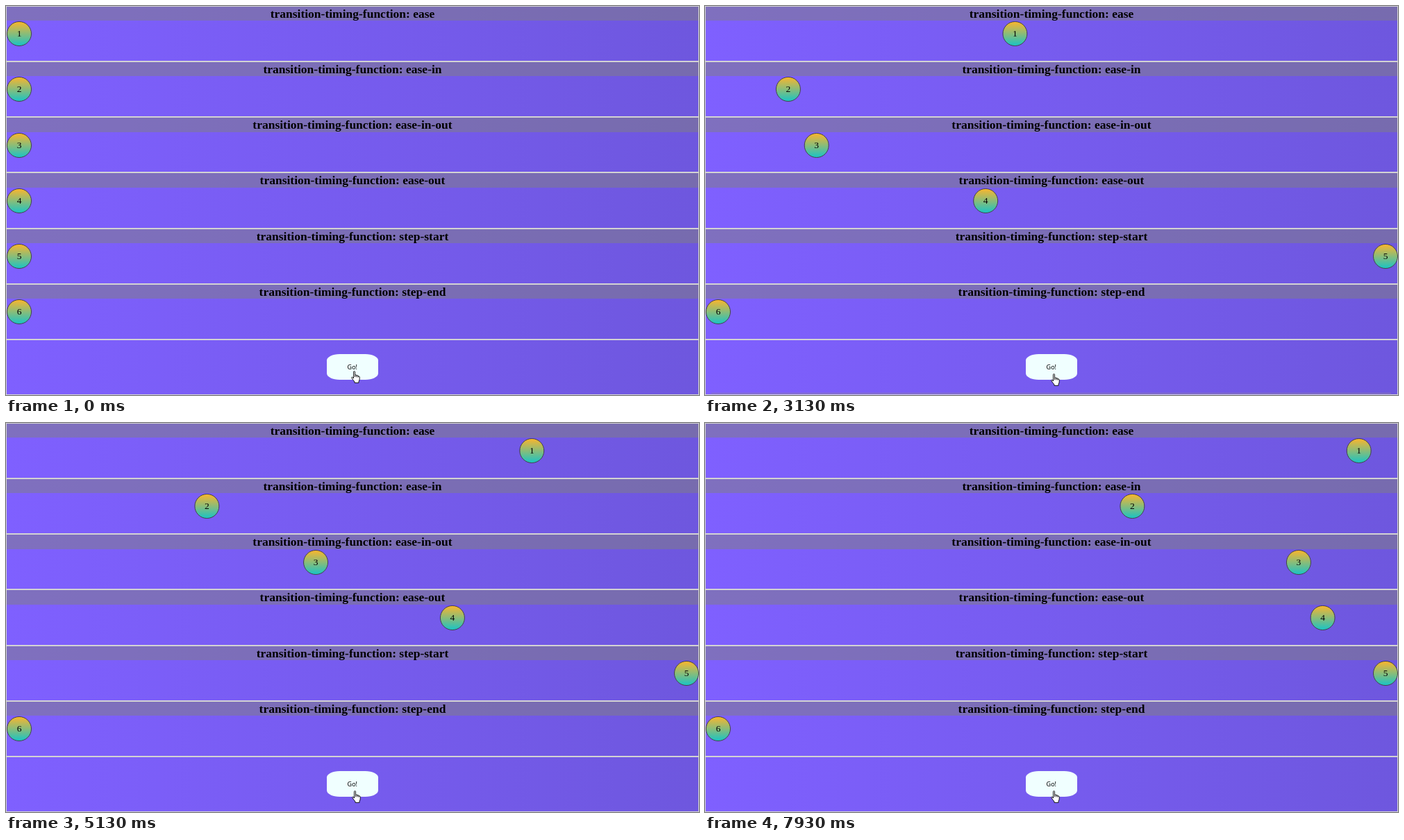
These frames come from a looping animation (998x561 px, 8 s). An HTML page:

```html
<!DOCTYPE html>
<html lang="en">
<head>
<meta charset="utf-8">
<title>Timing functions</title>
<style>
  html, body { margin: 0; width: 100%; height: 100%; overflow: hidden; }
  #stage {
    position: relative; width: 998px; height: 561px; overflow: hidden;
    background: linear-gradient(to right, #7f60ff, #6e57de);
    font-family: "Liberation Serif", serif; color: #000;
  }
  #stage > * { position: absolute; box-sizing: border-box; }
  .row { left: 0; width: 998px; height: 80.15px; border: .94px solid #d3d3d3; }
  .row h3 {
    margin: 0; height: 20.3px; background: rgba(128, 128, 128, .5);
    font-size: 17.5px; line-height: 20.3px; text-align: center;
  }
  .ball {
    left: 1px; width: 36px; height: 36px; border: 1.9px solid #444; border-radius: 50%;
    background: linear-gradient(#ffb529, #14c4c8) border-box;
    font-size: 13.5px; line-height: 33px; text-align: center;
  }
  #button {
    left: 462px; top: 502.3px; width: 73.6px; height: 36.8px;
    border-radius: 18.4px / 9.2px; background: azure;
    font: 9px/37px "Noto Sans", sans-serif; text-align: center;
  }
  #bar { left: 9px; top: 557.5px; width: 979px; height: 1.5px; background: #8878b4; }
  #hand { left: 497px; top: 526px; }
</style>
</head>
<body>
<div id="stage"></div>
<script>
const LOOP = 8000, STEP = 200 / 3, FIRST_TICK = 400;
const START = 480, DURATION = 9950, TRAVEL = 961, ROW = 80.15;

function bezier(x1, y1, x2, y2) {
  const curve = (a, b, s) => 3 * a * s * (1 - s) ** 2 + 3 * b * s * s * (1 - s) + s ** 3;
  return x => {
    let low = 0, high = 1;
    for (let i = 0; i < 30; i++) {
      const mid = (low + high) / 2;
      if (curve(x1, x2, mid) < x) low = mid; else high = mid;
    }
    return curve(y1, y2, low);
  };
}

const timings = [
  ["ease", bezier(.25, .1, .25, 1)],
  ["ease-in", bezier(.42, 0, 1, 1)],
  ["ease-in-out", bezier(.42, 0, .58, 1)],
  ["ease-out", bezier(0, 0, .58, 1)],
  ["step-start", p => p > 0 ? 1 : 0],
  ["step-end", p => p < 1 ? 0 : 1]
];

const stage = document.getElementById("stage");
const rows = timings.map(([name], i) =>
  `<div class="row" style="top:${i * ROW}px"><h3>transition-timing-function: ${name}</h3></div>
   <div class="ball" style="top:${22.2 + i * ROW}px">${i + 1}</div>`);
stage.innerHTML = rows.join("") + `
  <div class="row" style="top:${6 * ROW}px"></div>
  <div id="button">Go!</div>
  <div id="bar"></div>
  <svg id="hand" width="14" height="19" stroke="#000" stroke-width=".9" stroke-linejoin="round">
    <path fill="#fff" d="M3.5 11V1.8Q3.5.6 4.5.6T5.5 1.8V6.5Q6.3 5.7 7.7 6.2V7Q8.6 6.3 9.9 7V8Q12 7.4 12.2 9V12Q12 14 11 15.5V17.4H5V16Q3 13.5 1 10.8Q.3 9.3 1.5 9.2Q2.5 9.2 3.5 11Z"/>
    <path fill="none" d="M5.5 6.5V9M7.7 7V9.3M9.9 8V9.6"/>
  </svg>`;

const balls = [...stage.querySelectorAll(".ball")];
const bar = document.getElementById("bar");
const hand = document.getElementById("hand");
const ramp = (t, from, to) => Math.min(1, Math.max(0, (t - from) / (to - from)));

function draw(now) {
  // The picture advances 15 times a second, after an initial hold.
  const tick = Math.floor((now % LOOP - FIRST_TICK + 5) / STEP);
  const t = tick < 0 ? 0 : FIRST_TICK + tick * STEP;
  const progress = ramp(t, START, START + DURATION);
  balls.forEach((ball, i) => {
    ball.style.transform = `translateX(${TRAVEL * timings[i][1](progress)}px)`;
  });
  const press = ramp(t, 330, 470);
  hand.style.transform = `translate(${press}px, ${4 * press}px)`;
  bar.style.opacity = ramp(t, 430, 530) - ramp(t, 3700, 3950);
  requestAnimationFrame(() => draw(performance.now()));
}
draw(0);
</script>
</body>
</html>
```
